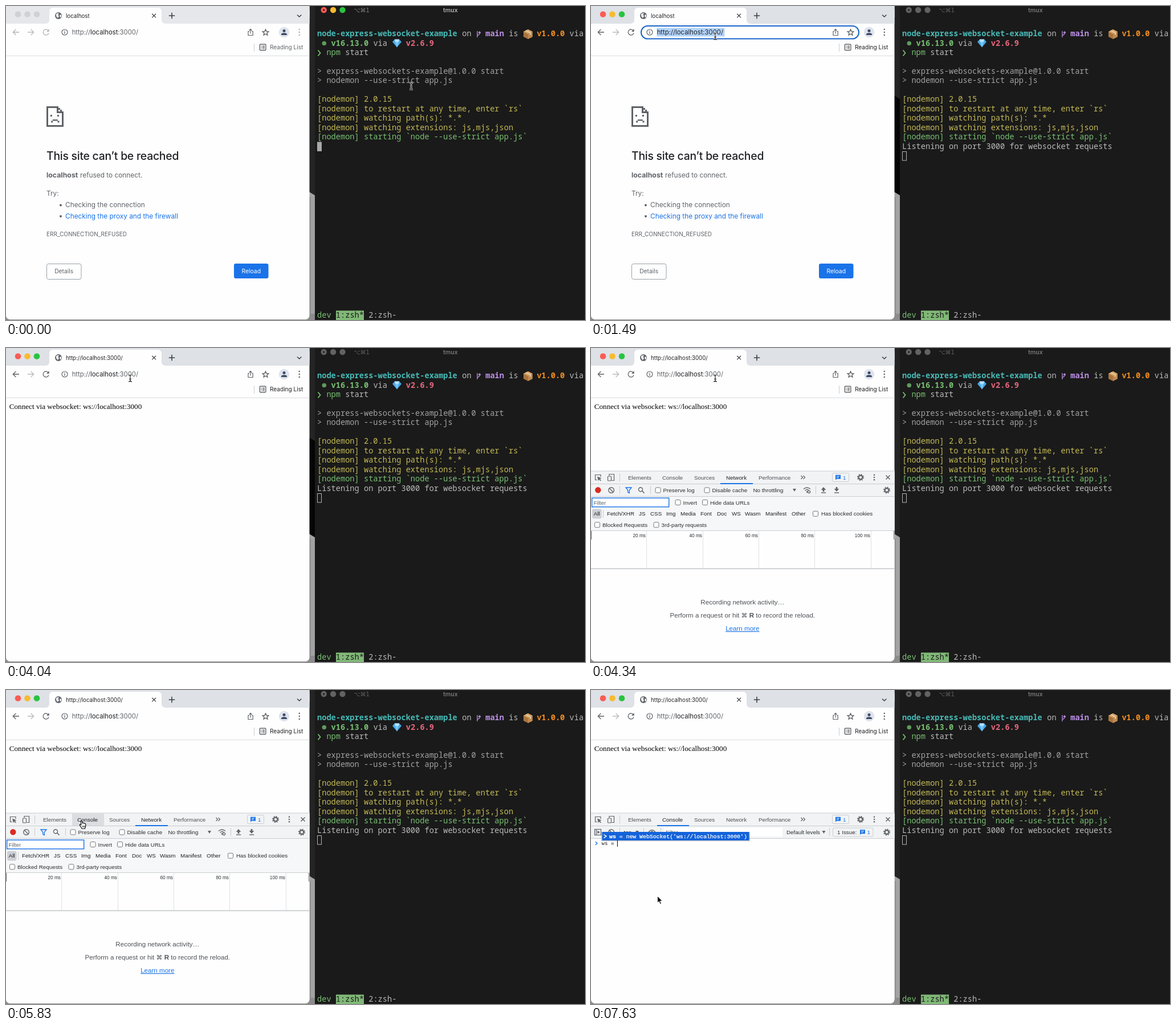
Recreate the animation shown at these times as an HTML page. Size 1016 px wide and 551 px high, loop 8 s.

```html
<!DOCTYPE html>
<html lang="en">
<head>
<meta charset="utf-8">
<title>Websocket demo</title>
<style>
html, body { margin: 0; width: 100%; height: 100%; overflow: hidden; background: #000; }
svg { display: block; width: 1016px; height: 551px; }
text { white-space: pre; }
.ui { font-family: Inter, Roboto, sans-serif; }
.dev { font-family: "Liberation Sans", Arial, sans-serif; }
.term { font-family: "Noto Sans Mono", "DejaVu Sans Mono", monospace; }
.serif { font-family: "Liberation Serif", serif; }
.code { font-family: "DejaVu Sans Mono", monospace; }
.pop { font-family: "Liberation Mono", monospace; }
.sym { font-family: "DejaVu Sans", sans-serif; }
</style>
</head>
<body>
<svg id="stage" viewBox="0 0 1016 551" xmlns="http://www.w3.org/2000/svg"></svg>
<script>
const LOOP = 8000;
const LISTEN = 150, FOCUS = 1040, LOADED = 1640, PANEL = 4190, NETWORK = 4340,
      HOVER = 5530, CONSOLE = 5980, TYPE = 7030, KEY = 150;
const INK = '#202124', GREY = '#5f6368', SLATE = '#4d5156', BLUE = '#1a73e8', EDGE = '#cacdd1', BAR = '#f1f3f4';

const during = (a, b, ...parts) => `<g data-a="${a}" data-b="${b}">${parts.join('')}</g>`;
const rect = (x, y, w, h, fill, more = '') =>
  `<rect x="${x}" y="${y}" width="${w}" height="${h}" fill="${fill}" ${more}/>`;
const box = (x, y, w, h, r, stroke, fill = 'none', sw = 1) =>
  rect(x, y, w, h, fill, `rx="${r}" stroke="${stroke}" stroke-width="${sw}"`);
const dot = (x, y, r, fill, more = '') => `<circle cx="${x}" cy="${y}" r="${r}" fill="${fill}" ${more}/>`;
const ring = (x, y, r, stroke, w = 1.3) => dot(x, y, r, 'none', `stroke="${stroke}" stroke-width="${w}"`);
const line = (d, stroke = GREY, w = 1.3) => `<path d="${d}" fill="none" stroke="${stroke}" stroke-width="${w}"/>`;
const shape = (d, fill, more = '') => `<path d="${d}" fill="${fill}" ${more}/>`;
const text = (cls, x, y, str, size, fill = INK, more = '') =>
  `<text class="${cls}" x="${x}" y="${y}" font-size="${size}" fill="${fill}" ${more}>${str}</text>`;
const MID = 'text-anchor="middle"', BOLD = 'font-weight="600"';

// ---------- terminal ----------
const CELL = 8.2, ROW = 16.45;
const term = (row, col, str, fill = '#b9b9b9', bold = false) =>
  text('term', 546 + col * CELL, 53.2 + row * ROW, str, 13.67, fill, bold ? BOLD : '');

const lights = (x, y, gap, r, colors) => colors.map((c, i) => dot(x + i * gap, y, r, c)).join('');
const RGB = ['#fb5b54', '#f8bb2f', '#29c33f'];

function titleBar(colors, fill, hint) {
  return lights(557.7, 7, 16.4, 5.2, colors) + dot(557.7, 7, 1.6, '#2b1514') +
    text('sym', 610, 11, '⌥⌘1', 10, hint) + text('ui', 780, 10.8, 'tmux', 10.6, fill, MID + ' ' + BOLD);
}

function terminal() {
  const yellow = '#c3b956', green = '#78bf72', violet = '#bd8fe6';
  const block = row => rect(546, 238.5 + (row - 12) * ROW, 8, 16.4, '#a9a9a9');
  return [
    rect(542, 0, 474, 551, '#1a1a1a'),
    during(0, FOCUS, titleBar(RGB, '#b0b0b0', '#808080')),
    during(FOCUS, LOOP, titleBar(Array(3).fill('#626262'), '#777', '#606060')),
    term(0, 0, 'node-express-websocket-example', '#46b9b5', true),
    term(0, 31, 'on'),
    line('M827 44V55M827 52C831 50 831.5 49 831 46M829 47.5L831 45 833 47.5', violet, 1.3),
    term(0, 36, 'main', violet, true), term(0, 41, 'is'),
    shape('M908 45L916 41 924 45V54L916 58 908 54Z', '#a8743f'),
    shape('M908 45L916 41 924 45 916 49Z', '#d6a468'),
    shape('M916 49L924 45V54L916 58Z', '#c08a50'),
    shape('M911 43.5L919 47.5V51L921 50V46.5L913 42.5Z', '#e7cfa6'),
    term(0, 47, 'v1.0.0', '#f08c1e', true), term(0, 54, 'via'),
    dot(558.3, 65.5, 3.8, '#5f9a5c'),
    term(1, 3, 'v16.13.0', green, true), term(1, 12, 'via'),
    shape('M678 63L682 58.5H690L694 63 686 72.5Z', '#4aa7e6'),
    shape('M682 58.5H690L689 63H683Z', '#b5e3fb'),
    shape('M683 63H689L686 72.5Z', '#79c8f5'),
    term(1, 19, 'v2.6.9', '#e8677e', true),
    line('M547.5 77.5L551.5 82.5 547.5 87.5', green, 1.8),
    term(2, 2, 'npm', green), term(2, 6, 'start'),
    term(4, 0, '&gt; express-websockets-example@1.0.0 start', '#a2a2a2'),
    term(5, 0, '&gt; nodemon --use-strict app.js', '#a2a2a2'),
    ['2.0.15', 'to restart at any time, enter `rs`', 'watching path(s): *.*',
      'watching extensions: js,mjs,json'].map((s, i) => term(7 + i, 0, '[nodemon] ' + s, yellow)).join(''),
    term(11, 0, '[nodemon] starting `node --use-strict app.js`', green),
    during(0, LISTEN, block(12)),
    during(LISTEN, LOOP, term(12, 0, 'Listening on port 3000 for websocket requests')),
    during(LISTEN, FOCUS, block(13)),
    during(FOCUS, LOOP, box(546.5, 255.5, 7, 15.5, 0, '#b5b5b5')),
    rect(579, 534.5, 49, 16.5, '#80b877'),
    term(30, 0, 'dev', green), term(30, 4, '1:zsh*', '#1a1a1a'), term(30, 11, '2:zsh-')
  ].join('');
}

// ---------- browser ----------
const sep = (x, y, h = 14) => rect(x, y, 1, h, '#c8cbd0');
const dots = (x, y, gap, r, c) => [-1, 0, 1].map(i => dot(x, y + i * gap, r, c)).join('');

function toolbarIcons(main, label) {
  return [
    line('M23 46H12.5M17.3 41L12.3 46 17.3 51', main),
    line('M38 46H48.5M43.7 41L48.7 46 43.7 51', '#b9bcc0'),
    line('M74.3 43.2A5 5 0 1 0 75 47.3', main), shape('M75.6 40.3V45H71Z', main),
    dots(514.8, 46, 5, 1.3, main),
    text('ui', 463, 76, 'Reading List', 10.1, label)
  ].join('');
}

function chrome() {
  const url = side => text('ui', 115.7, 50.2,
    `<tspan fill="${side}">http://</tspan>localhost<tspan fill="${side}">:3000/</tspan>`, 11.3, INK);
  return [
    rect(0, 0, 532.5, 550, '#fefefe', 'rx="7"'), rect(0, 0, 532.5, 20, '#fefefe'),
    during(0, FOCUS, rect(0, 0, 532.5, 31, '#e5e7ea'), lights(21, 14.5, 16.5, 5.3, Array(3).fill('#cfd1d4'))),
    during(FOCUS, LOOP, rect(0, 0, 532.5, 31, '#dee1e6'), lights(21, 14.5, 16.5, 5.3, RGB)),
    shape('M69 31Q76 31 76 24V10Q76 3 83 3H266Q273 3 273 10V24Q273 31 280 31Z', '#fefefe'),
    dot(92, 17, 6, GREY),
    shape('M88 14Q91 11.5 93 13L91.5 15.5 93 18 91 21Q87 18.5 88 14ZM94 16L97 15V19L95 20.5Z', '#f1f3f4'),
    during(0, LOADED, text('ui', 105, 20.6, 'localhost', 9.75)),
    during(LOADED, LOOP, text('ui', 105, 20.6, 'http://localhost:3000/', 9.7)),
    line('M256.3 13.7L263 20.4M263 13.7L256.3 20.4', '#3c4043'),
    line('M285.8 17H296.2M291 11.8V22.2', '#3c4043', 1.6),
    line('M511 15.5L514.7 19 518.4 15.5', '#3c4043', 1.5),
    during(0, FOCUS, toolbarIcons('#b0b3b7', GREY)), during(FOCUS, LOOP, toolbarIcons(GREY, INK)),
    during(FOCUS, LOADED, box(88, 35, 382, 22.6, 11.3, '#1b66c9', '#fefefe', 2), rect(115.5, 38.5, 119, 15, '#b3d4fc')),
    ring(103, 46, 5, GREY, 1.2), rect(102.4, 45.2, 1.3, 3.6, GREY), rect(102.4, 43, 1.3, 1.3, GREY),
    during(0, FOCUS, url(GREY)), during(FOCUS, LOADED, url(INK)), during(LOADED, LOOP, url(GREY)),
    line('M427 44.5H425V51.5H433.2V44.5H431.2M429.1 48.5V40.8M426.7 43L429.1 40.6 431.5 43', GREY, 1.2),
    line('M455.5 41L457 44.6 460.9 44.9 457.9 47.4 458.9 51.2 455.5 49.1 452.1 51.2 453.1 47.4 450.1 44.9 454 44.6Z', '#4a4d51', 1.2),
    dot(488, 46, 9.2, '#dfe3ec'), dot(488, 43.6, 2.5, '#3d4a67'),
    shape('M483 51V50Q483 47.3 488 47.3T493 50V51Z', '#3d4a67'),
    sep(435, 66), box(445.3, 67.2, 10.6, 10.4, 1, '#4a4d51', 'none', 1.2),
    line('M447.3 70H448.6M449.8 70H454M447.3 72.4H448.6M449.8 72.4H454M447.3 74.8H448.6M449.8 74.8H454', '#4a4d51', 1.1),
    rect(0, 87, 532.5, 1, '#dadce0')
  ].join('');
}

function sadPage() {
  // x, y, w, h in units of three pixels
  const bits = ['0 0 1 12', '0 0 7 1', '0 11 10 1', '9 3 1 9', '6 0 1 4', '6 3 4 1', '7 1 1 1', '8 2 1 1',
    '2.3 5 1 1', '6.3 5 1 1', '3.6 7.7 3 .8', '2.7 8.5 1 1', '6.5 8.5 1 1'];
  return bits.map(b => {
    const [x, y, w, h] = b.split(' ').map(Number);
    return rect(71 + x * 3, 176 + y * 3, w * 3, h * 3, GREY);
  }).join('');
}

function errorPage() {
  const p = (x, y, s, fill = GREY) => text('ui', x, y, s, 11.85, fill);
  return [
    sadPage(),
    text('ui', 71, 269.6, 'This site can’t be reached', 19.4, INK, 'font-weight="500" letter-spacing="-.25"'),
    text('ui', 71, 301, 'localhost', 12.3, GREY, 'font-weight="700"'), p(130, 301, 'refused to connect.'),
    p(71, 333, 'Try:'), dot(96, 349.5, 2, GREY), dot(96, 369, 2, GREY),
    p(104, 353.2, 'Checking the connection'), p(104, 372.8, 'Checking the proxy and the firewall', BLUE),
    text('ui', 71, 404.4, 'ERR_CONNECTION_REFUSED', 10, GREY),
    box(71.5, 452.5, 60.5, 27, 3, '#9aa0a6'), text('ui', 101.7, 469.4, 'Details', 10.3, GREY, MID),
    rect(400, 452, 60.5, 26, BLUE, 'rx="3.3"'), text('ui', 430.2, 468.7, 'Reload', 10.4, '#fff', MID)
  ].join('');
}

// ---------- developer panel ----------
const dev = (x, y, s, fill = '#2b2e31', more) => text('dev', x, y, s, 9.84, fill, more);
const check = (x, y, label, gap = 14) =>
  box(x + .5, y - 4.5, 9, 9, 1.8, '#767676', '#fff') + dev(x + gap, y + 3.5, label);
const gear = (x, y) => ring(x, y, 3.4, GREY, 2.2) +
  `<circle cx="${x}" cy="${y}" r="5.2" fill="none" stroke="${GREY}" stroke-width="1.6" stroke-dasharray="2.04 2.04"/>`;
const ban = (x, y) => ring(x, y, 4.8, GREY, 1.4) + line(`M${x - 3.4} ${y - 3.4}l6.8 6.8`, GREY, 1.4);
const down = (x, y) => shape(`M${x} ${y}h6l-3 5z`, GREY);
const bubble = (x, y) => shape(`M${x} ${y}h9v7h-7l-2 2z`, BLUE) +
  line(`M${x + 2} ${y + 2.3}h5M${x + 2} ${y + 4.6}h3.5`, '#fff', .9);
const tabMark = (x, w) => rect(x, 237, w, 2, BLUE);

function panel() {
  const tab = (x, s, fill = SLATE) => dev(x, 230.6, s, fill);
  return [
    rect(0, 215.5, 532.5, 327.5, '#fefefe'),
    rect(0, 216, 532.5, 45, BAR), rect(0, 215.5, 532.5, 1, EDGE),
    during(HOVER, CONSOLE, rect(116, 217, 56, 21, '#dbdde1')),
    rect(0, 238, 532.5, 1, EDGE), rect(0, 260, 532.5, 1, EDGE),
    line('M11 231.5H7.5V222.5H17V226', GREY, 1.2), shape('M11 225.5L18.5 228.5 15.5 229.7 18 232.2 16.7 233.3 14.3 230.8 13 233.5Z', GREY),
    line('M32 224V221.5H40.5V232.5H36.5', GREY, 1.2), box(29.5, 225, 6, 8, 1, GREY, BAR, 1.2),
    sep(50, 220),
    tab(65, 'Elements'), tab(181, 'Sources'), tab(294, 'Performance'),
    during(PANEL, HOVER, tab(125, 'Console')), during(HOVER, LOOP, tab(125, 'Console', INK)),
    during(PANEL, CONSOLE, tab(237, 'Network', INK)), during(CONSOLE, LOOP, tab(237, 'Network')),
    line('M368.5 224L371.5 227 368.5 230M372.5 224L375.5 227 372.5 230', GREY, 1.2),
    box(423.5, 219.5, 29, 15, 2, EDGE), bubble(429, 222.8), dev(442, 230.6, '1', BLUE),
    gear(473, 227), dots(497, 227, 4.3, 1.25, GREY), line('M517.5 223.5L524.5 230.5M524.5 223.5L517.5 230.5', GREY, 1.5)
  ].join('');
}

function network() {
  const kinds = [['Fetch/XHR', 28], ['JS', 84], ['CSS', 104], ['Img', 132], ['Media', 157], ['Font', 192], ['Doc', 221],
    ['WS', 247], ['Wasm', 270], ['Manifest', 306], ['Other', 352]];
  const ticks = [1, 2, 3, 4, 5].map(i => {
    const x = Math.round(98.4 * i - 1.2);
    return rect(x, 321, 1, 66, '#dfe1e4') + text('dev', x - 1, 332, i * 20 + ' ms', 8.3, '#2b2e31', 'text-anchor="end"');
  });
  const hint = (y, s, fill = SLATE, more = '') => text('dev', 265.8, y, s, 11.6, fill, MID + ' ' + more);
  return [
    rect(0, 261, 532.5, 59, '#f6f7f8'), tabMark(227, 57),
    dot(12.3, 249.3, 5.2, '#d92b21'), ban(35.6, 249.5), sep(50, 242),
    line('M61 245H71L67.3 249.5V254.5L64.7 253V249.5Z', BLUE, 1.3),
    ring(87, 248.2, 3.5, GREY, 1.4), line('M89.6 250.8L93.6 254.8', GREY, 1.6), sep(104, 242),
    check(112.5, 249.5, 'Preserve log'), check(198.5, 249.5, 'Disable cache'),
    dev(284.5, 253, 'No throttling'), down(354, 247),
    line('M373 247.5Q379 242.5 385 247.5M375.5 250.2Q379 247.3 382 249.5', GREY, 1.4),
    dot(379, 252.5, 1.3, GREY), ring(382.5, 252.5, 2.1, GREY, 1.3), sep(394, 242),
    shape('M408 244L412.3 249H409.4V252H406.6V249H403.7Z', GREY), rect(404, 253.3, 8.2, 1.4, GREY),
    shape('M431 252L435.3 247H432.4V244H429.6V247H426.7Z', GREY), rect(427, 253.3, 8.2, 1.4, GREY),
    gear(519, 249.5),
    box(1.7, 263.2, 135, 15.6, 0, BLUE, '#fff', 1.4), dev(4.5, 274.8, 'Filter', GREY),
    check(147.5, 271, 'Invert'), check(195, 271, 'Hide data URLs'),
    rect(2, 282.5, 16.5, 17, '#cdd0d4', 'rx="3"'), dev(4.7, 294.4, 'All', INK), sep(21, 284),
    kinds.map(([s, x]) => dev(x, 294.4, s, INK)).join(''),
    check(389, 290.8, 'Has blocked cookies', 15), check(6, 310.3, 'Blocked Requests'), check(109.5, 310.3, '3rd-party requests'),
    rect(0, 320, 532.5, 1, EDGE), ticks.join(''),
    rect(0, 321, 1.2, 15, '#777'), rect(531, 321, 1.2, 15, '#777'), rect(0, 386.5, 532.5, 1.6, '#c6c8cb'),
    hint(450.2, 'Recording network activity…'),
    hint(473, 'Perform a request or hit <tspan class="sym" font-size="11">⌘</tspan><tspan font-weight="700"> R</tspan> to record the reload.'),
    hint(496, 'Learn more', BLUE, 'text-decoration="underline"'),
    during(4790, 5090, rect(5, 266, 1, 11, '#000'))
  ].join('');
}

function consoleTab() {
  const typed = 'ws = ', step = 5.48;
  const caret = n => rect(18.5 + n * step, 264, 1, 11, '#000');
  return [
    tabMark(116, 56),
    box(6.5, 244.5, 11, 10, 0, GREY, 'none', 1.2), line('M9.3 244.5V254.5', GREY, 1.2), shape('M11.3 246.6L15.6 249.5 11.3 252.4Z', GREY),
    ban(35.6, 249.5), sep(50, 242), dev(57.5, 253, 'top'), down(78, 247), sep(92, 242),
    line('M101 249.5Q107 241.8 113 249.5Q107 257.2 101 249.5Z', GREY, 1.4), dot(107, 249.5, 2.2, GREY), sep(122, 242),
    rect(128, 241.5, 208, 16, '#fff'), dev(131, 253, 'Filter', GREY),
    dev(343, 253, 'Default levels'), down(405.5, 247), sep(418, 242),
    box(424.5, 242, 70.5, 15, 2, EDGE), dev(432, 253, '1 Issue:'), bubble(472, 245.2), dev(484.5, 253, '1', BLUE),
    gear(519, 249.5),
    line('M7.7 266L11 269 7.7 272', '#2b7de9', 1.4),
    during(6730, TYPE, caret(0)),
    [...typed].map((_, i) => during(TYPE + i * KEY, i < 4 ? TYPE + (i + 1) * KEY : LOOP,
      text('code', 18.5, 272, typed.slice(0, i + 1), 9.1, '#222'), i ? caret(i + 1) : '')).join(''),
    during(TYPE + KEY, LOOP,
      rect(18, 249, 261, 16.5, '#000', 'opacity=".18" rx="1"'), rect(19.5, 249, 258, 15, '#1463da'),
      line('M22.5 253.6L27 256.6 22.5 259.6', '#fff', 1.3),
      text('pop', 32, 259.8, '<tspan font-weight="700">ws</tspan> = new WebSocket(\'ws://localhost:3000\')', 9.84, '#fff', 'stroke="#fff" stroke-width=".25"'))
  ].join('');
}

// ---------- desktop strip and pointer ----------
const desktop = () => rect(525, 0, 20, 551, '#242424') +
  during(FOCUS, PANEL, shape('M525 153L545 165V340H525Z', '#050505')) +
  shape('M525 322L545 334V551H525Z', '#a2a2a2') + rect(532.5, 335, 2, 216, '#858585') + rect(0, 540, 545, 11, '#8c8c8c');

const POINTERS = {
  beam: () => ['#fff', '#111'].map((c, i) =>
    line('M-3 -6Q0 -6 0 -4Q0 -6 3 -6M0 -4V4M-3 6Q0 6 0 4Q0 6 3 6M-1.8 1.5H1.8', c, i ? 1.1 : 2.6)).join(''),
  arrow: () => shape('M0 0V12.2L2.8 9.6 4.8 14.2 6.9 13.3 4.9 8.8H8.7Z', '#000', 'stroke="#fff" stroke-width="1"'),
  hand: () => shape('M-3.2 -6Q-2 -7.6 -.9 -6L-.6 -2.4Q.7 -3.4 1.5 -2.2Q2.7 -3 3.5 -1.7Q5.2 -2.2 5.4 0L5 4Q4.4 5.2 4 7.2H-1.6Q-2.4 4.8 -4.6 2.2Q-5.8 .3 -4.6 -.2Q-3.6 -.3 -2.6 1.2Z',
    '#fff', 'stroke="#000" stroke-width="1.1"') + line('M-.2 2V5M1.7 2V5M3.5 2V5', '#000', .8)
};
const MOVES = [
  [0, 'beam', 711, 140.5], [450, 'beam', 655, 112], [600, 'arrow', 352, 1], [740, 'beam', 218, 53],
  [5090, 'arrow', 129.5, 198], [5240, 'arrow', 128, 205], [5390, 'arrow', 129, 213],
  [HOVER, 'hand', 132, 229], [5680, 'hand', 133.5, 234], [5830, 'hand', 134.5, 236],
  [6130, 'arrow', 120, 327], [6280, 'arrow', 116.5, 361.5]
];
const pointer = () => MOVES.map(([at, kind, x, y], i) =>
  during(at, i + 1 < MOVES.length ? MOVES[i + 1][0] : LOOP, `<g transform="translate(${x} ${y})">${POINTERS[kind]()}</g>`)).join('');

const stage = document.getElementById('stage');
stage.innerHTML = [
  desktop(), terminal(), chrome(),
  during(0, LOADED, errorPage()),
  during(LOADED, LOOP, text('serif', 5.7, 106.5, 'Connect via websocket: ws://localhost:3000', 13.2, '#000')),
  during(PANEL, LOOP, panel()),
  during(NETWORK, CONSOLE, network()),
  during(CONSOLE, LOOP, consoleTab()),
  pointer()
].join('');

const timed = [...stage.querySelectorAll('[data-a]')].map(el => ({ el, a: +el.dataset.a, b: +el.dataset.b }));
const start = performance.now();
function draw() {
  const t = (performance.now() - start) % LOOP;
  for (const { el, a, b } of timed) el.style.display = t >= a && t < b ? '' : 'none';
  requestAnimationFrame(draw);
}
draw();
</script>
</body>
</html>
```
